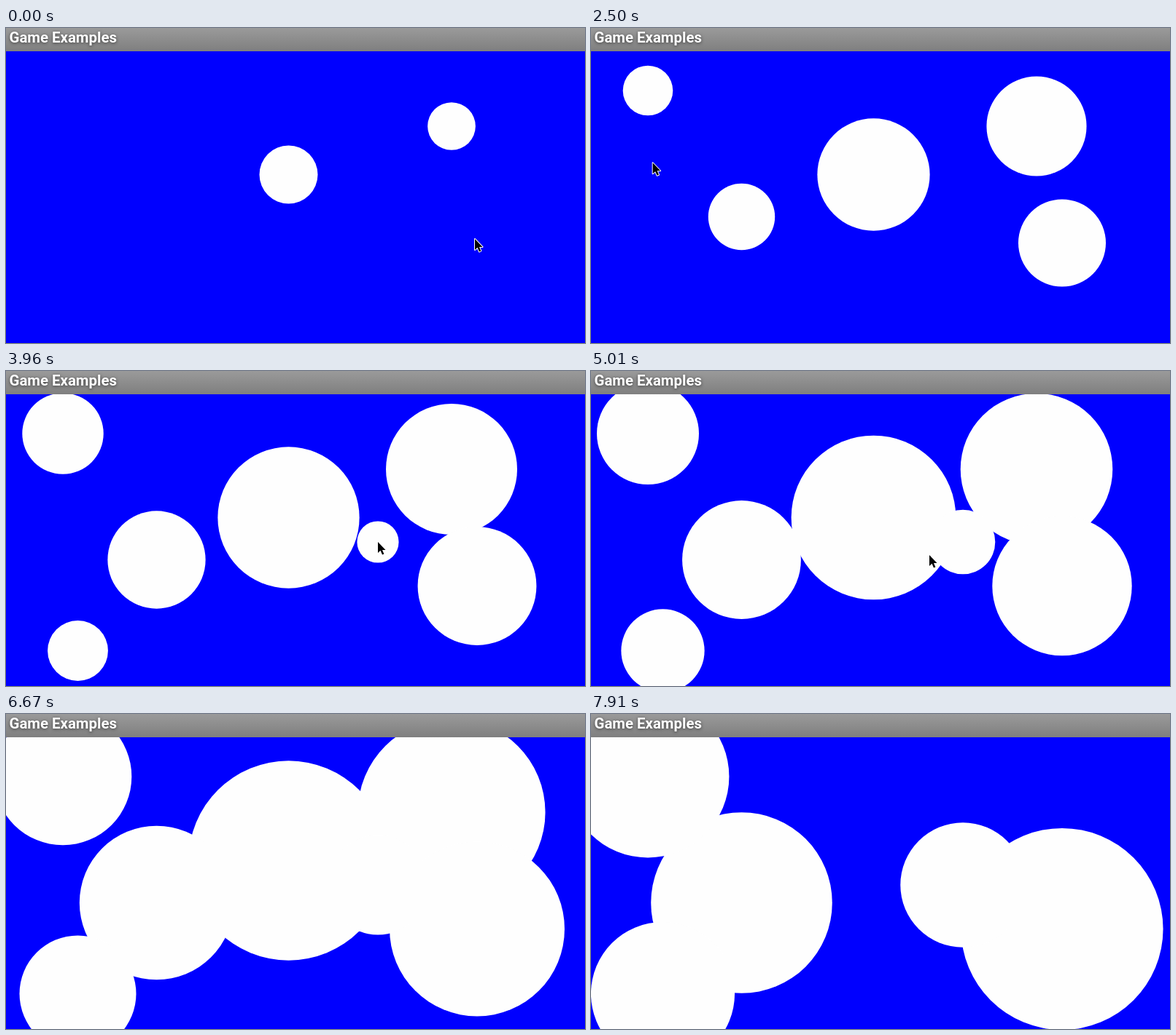
These frames come from a looping animation (794 by 433 pixels, 8000 ms). An HTML page with a canvas:

```html
<!DOCTYPE html>
<html lang="en">
<head>
<meta charset="utf-8">
<title>Game Examples</title>
<style>
  html, body { margin: 0; width: 100%; height: 100%; overflow: hidden; background: #00f; }
  canvas { display: block; }
</style>
</head>
<body>
<canvas id="stage" width="794" height="433"></canvas>
<script>
const ctx = document.getElementById('stage').getContext('2d');

const LOOP = 8000;
const STEP = 208.1;      // ms between picture updates
const GROWTH = 2.1;      // size units gained per step
const UNIT = 1 / 0.7;    // pixels per size unit
const BORN = 19.6, POP = 100;
const BAR = 32;

// Centre and size at step 0; a circle shows while its size is between BORN and POP.
const circles = [
  { x: 387.5, y: 201.5, size: 28.9 },
  { x: 611, y: 135, size: 23.15 },
  { x: 646, y: 295.5, size: 17.55 },
  { x: 206.5, y: 259.5, size: 7.55 },
  { x: 78, y: 86, size: -0.85 },
  { x: 98.5, y: 384.5, size: -10.3 },
  { x: 510, y: 235, size: -19.1 }
];

// Pointer stops: step, x, y
const pointerPath = [
  [0, 643, 290], [1, 646, 295], [3, 720, 363], [6, 206, 259], [8, 234, 267],
  [10, 78, 86], [11, 78, 86], [14, 98, 384], [15, 127, 383], [18, 510, 235],
  [20, 510, 235], [24, 464, 253], [27, 440, 440]
];

const barFill = ctx.createLinearGradient(0, 0, 0, BAR);
barFill.addColorStop(0, '#9a9a9a');
barFill.addColorStop(1, '#7f7f7f');

const arrow = new Path2D('M0 0V15L3.5 11.8L6 17.5L8.4 16.4L6 11H10.5Z');

function drawCircle({ x, y, size }, step) {
  const grown = size + GROWTH * step;
  if (grown < BORN || grown >= POP) return;
  ctx.beginPath();
  ctx.arc(x, y, Math.floor(grown) * UNIT, 0, Math.PI * 2);
  ctx.fill();
}

function drawPointer(step) {
  const next = pointerPath.findIndex(stop => stop[0] > step);
  if (next < 0) return;
  const [s0, x0, y0] = pointerPath[next - 1];
  const [s1, x1, y1] = pointerPath[next];
  const k = (step - s0) / (s1 - s0);
  ctx.save();
  ctx.translate(x0 + (x1 - x0) * k, y0 + (y1 - y0) * k);
  ctx.lineWidth = 2;
  ctx.lineJoin = 'round';
  ctx.strokeStyle = '#fff';
  ctx.stroke(arrow);
  ctx.fillStyle = '#000';
  ctx.fill(arrow);
  ctx.restore();
}

function drawBar() {
  ctx.fillStyle = barFill;
  ctx.fillRect(0, 0, 794, BAR);
  ctx.save();
  ctx.shadowColor = 'rgba(0, 0, 0, .55)';
  ctx.shadowBlur = 4;
  ctx.shadowOffsetY = 1;
  ctx.fillStyle = '#fff';
  ctx.font = 'bold 20.4px Roboto, sans-serif';
  ctx.fillText('Game Examples', 4.5, 20);
  ctx.restore();
}

function draw(now) {
  const step = Math.floor((now % LOOP) / STEP);
  ctx.fillStyle = '#00f';
  ctx.fillRect(0, 0, 794, 433);
  ctx.fillStyle = '#fefefe';
  circles.forEach(circle => drawCircle(circle, step));
  drawBar();
  drawPointer(step);
}

const start = performance.now();
function tick() {
  draw(performance.now() - start);
  requestAnimationFrame(tick);
}
tick();
</script>
</body>
</html>
```
